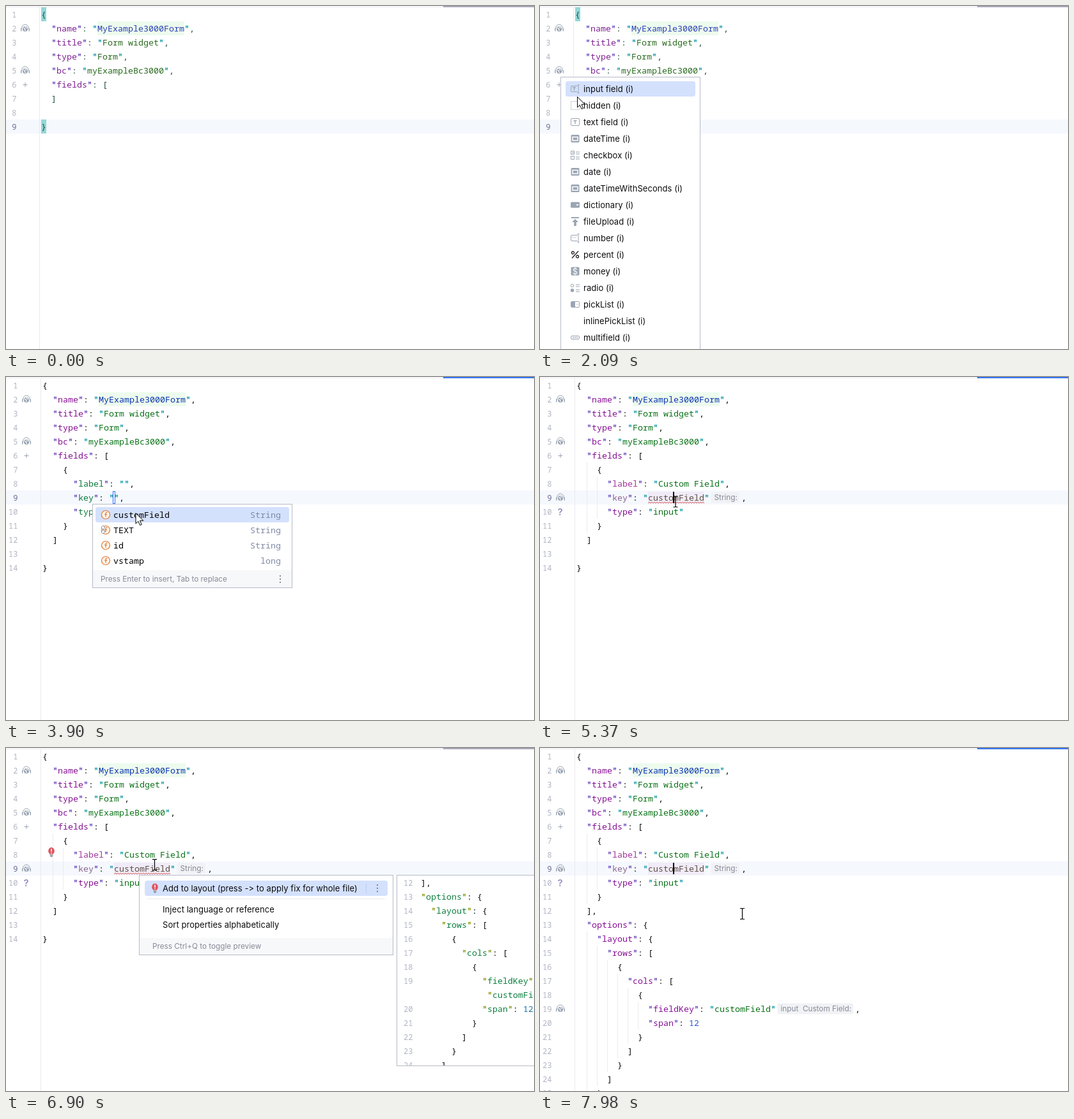
Write an HTML page that moves like this. It is 826x538 px and loops after 8000 ms.

```html
<!DOCTYPE html>
<html lang="en">
<head>
<meta charset="utf-8">
<title>Form widget editor</title>
<style>
  html, body { margin: 0; width: 100%; height: 100%; overflow: hidden; background: #fff; }
  svg { display: block; width: 826px; height: 538px; }
  text { white-space: pre; font-variant-ligatures: none; font-feature-settings: "calt" 0; }
  .mono { font: 13.333px "Noto Sans Mono", "DejaVu Sans Mono", monospace; }
  .ui { font: 13px Inter, "Open Sans", sans-serif; letter-spacing: .06px; fill: #0c0c0e; }
  .small { font: 11.75px Inter, "Open Sans", sans-serif; fill: #858a96; }
  .num { font: 12px "Noto Sans Mono", monospace; text-anchor: end; fill: #b0b5c3; }
  .num.cur { fill: #6c6a94; }
  .help { font: 600 15px Inter, sans-serif; fill: #9a8fc4; }
  .end { text-anchor: end; }
  .type { fill: #7f8aa3; }
  .icon { fill: none; stroke: #9aa5b3; }
  .solid { fill: #9aa5b3; stroke: none; }
  .paper { fill: #fff; stroke: none; }

  .punct { fill: #0a0a0a; }
  .key { fill: #871094; }
  .str { fill: #0a7217; }
  .name { fill: #0a35b0; }
  .digit { fill: #2e5bdc; }
  .kq { fill: #6f4fc0; stroke: #6f4fc0; stroke-width: .5px; }
  .sq { fill: #1c9fac; stroke: #1c9fac; stroke-width: .5px; }
  .key.pink { fill: #a5359c; }
  .key.dim { fill: #8a6590; }
  .key.fresh { fill: #0d7c3c; }
  .str.brown { fill: #5f5148; }
  .idle .punct { fill: #1f4d3d; }
  .idle .key { fill: #7f2292; }
  .idle .str { fill: #2a6b1f; }
  .idle .name { fill: #2c42b6; }
  .preview .key, .preview .str { fill: #0d8040; }
  .preview .kq, .preview .sq { fill: #8f9c18; stroke: #8f9c18; }
  .preview .digit { fill: #1a78a8; }
</style>
</head>
<body>
<svg id="stage" viewBox="0 0 826 538"></svg>
<script>
const LOOP = 8000, COL = 8, ROW = 22;
const mid = row => 13 + ROW * (row - 1);

const text = (x, y, s, cls) => `<text x="${x}" y="${y}" class="${cls}">${s}</text>`;
const rect = (x, y, w, h, fill, more = '') =>
  `<rect x="${x}" y="${y}" width="${w}" height="${h}" fill="${fill}" ${more}/>`;
const path = (d, more = '') => `<path d="${d}" ${more}/>`;
const at = (x, y, s) => `<g transform="translate(${x} ${y})">${s}</g>`;
// Windows are start/end pairs in ms.
const layer = (windows, s) => `<g data-on="${windows}">${s}</g>`;
const frame = (x, y, w, h) => rect(x + .5, y + .5, w, h, '#fff', 'stroke="#b7bac8"');
const dots = (x, y) => [-5, 0, 5].map(d => `<circle cx="${x}" cy="${y + d}" r="1.1" fill="#6c707e"/>`).join('');

function codeLine(src, x, y, keyTone = '', strTone = '') {
  const token = /"([^"]*)"(:?)|(\d+)|<([^|]+)\|(\d+)>|[^"\d<]+/g;
  let out = '';
  for (const [all, body, colon, digits, hint, room] of src.matchAll(token)) {
    if (hint) {
      out += rect(x + 2.5, y - 8.5, room - 5.5, 17, '#f1f2f5', 'rx="3"') + text(x + 7.5, y + 4, hint, 'small');
      x += +room;
      continue;
    }
    if (body !== undefined) {
      const quote = `<tspan class="${colon ? 'kq' : 'sq'}">"</tspan>`;
      const cls = colon ? 'key ' + keyTone : body.startsWith('MyEx') ? 'name' : 'str ' + strTone;
      if (cls === 'name') out += rect(x + COL, y - 11, body.length * COL, ROW, '#edfbee');
      out += text(x, y + 5, `${quote}<tspan class="${cls}">${body}</tspan>${quote}<tspan class="punct">${colon}</tspan>`, 'mono');
    } else {
      out += text(x, y + 5, all, 'mono ' + (digits ? 'digit' : 'punct'));
    }
    x += all.length * COL;
  }
  return out;
}

function code(rows, { x, numX = x - 38.5, first = 1, top = 13, cur = 9, guides = false, keys = {}, strs = {} }) {
  let n = first - 1, out = '';
  rows.forEach((row, i) => {
    const y = top + ROW * i, wrapped = row[0] === '~';
    const src = wrapped ? row.slice(1) : row;
    if (!wrapped) {
      n++;
      out += text(numX, y + 4.5, n, n === cur ? 'num cur' : 'num');
    }
    const depth = src.search(/\S/);
    for (let c = 2; guides && c < depth; c += 2) out += rect(x + c * COL, y - 11, 1, ROW, '#ebecf0');
    out += codeLine(src, x, y, keys[n], strs[n]);
  });
  return out;
}

const globe = (x, row) => at(x, mid(row),
  path('M-5.5 1V0a5.5 6 0 0 1 11 0v1', 'class="icon"') +
  path('M-6.3 0v4.500M6.300 0v4.500', 'class="icon" stroke-width="1.4"') +
  '<circle cy="1" r="4" class="solid"/>' +
  path('M-3-.5l2.500 1 0 1.500 1 2M0-2.500l1 1.500 2 .5', 'fill="none" stroke="#fff" stroke-width="1.2"'));
const plus = x => path(`M${x - 3.5} 123.5h7M${x} 120v7`, 'class="icon"');
const chevron = row => path(`M41.5 ${mid(row) - 1.5}l3.7 3.5 3.7-3.5`, 'class="icon"');
const caret = x => rect(x - 1, 180, 2, 18, '#000');
const bulb = (x, y) => at(x, y,
  path('M-2.5 3.5C-6.5 0-5-7 0-7s6.5 7 2.5 10.5z', 'fill="#e0555d"') +
  path('M-2.5 5h5M-2 7h4', 'stroke="#8b8f9c" stroke-width="1.3"') +
  path('M0-5v4.5M0 .8v1.5', 'stroke="#fff" stroke-width="1.5"'));

const head = ['{', '  "name": "MyExample3000Form",', '  "title": "Form widget",', '  "type": "Form",',
  '  "bc": "myExampleBc3000",', '  "fields": ['];
const tail = ['  ]', '', '}'];
const field = (label, key, comma = ',') => ['    {', `      "label": "${label}",`, `      "key": "${key}"${comma}`,
  '      "type": "input"', '    }'];
const custom = field('Custom Field', 'customField', '<String:|50>,');
const options = hint => ['  ],', '  "options": {', '    "layout": {', '      "rows": [', '        {',
  '          "cols": [', '            {', `              "fieldKey": "customField"${hint},`,
  '              "span": 12', '            }', '          ]', '        }', '      ]', '    }'];

const wide = { x: 57 };
const tuned = { x: 57, guides: true, keys: { 8: 'pink', 9: 'dim' }, strs: { 9: 'brown' } };
const margin = x => rect(x - 3, 2, 1, 536, '#e9eaef') + globe(x - 25, 2) + globe(x - 25, 5) + plus(x - 25);

const editor =
  rect(0, 1, 826, 1, '#ebecf0') + rect(0, 178, 826, ROW, '#f5f8fd') +
  layer('0 2860 6350 7470', rect(684, 0, 142, 2, '#a9a7bb')) +
  layer('2860 6350 7470 8000', rect(684, 0, 142, 2, '#3574f0')) +
  layer('0 2860', '<g class="idle">' + margin(55) +
    rect(55, 2, 8, ROW, '#93d8d8') + rect(55, 178, 8, ROW, '#93d8d8') +
    code([...head, ...tail], { x: 55 }) + '</g>') +
  layer('770 1700', chevron(1) + chevron(6)) +
  layer('2860 8000', margin(57)) +
  layer('2860 4310', code([...head, ...field('', ''), ...tail],
    { ...wide, keys: { 8: 'fresh', 9: 'fresh', 10: 'fresh' } }) +
    rect(167.5, 179.5, 3, 19, 'none', 'stroke="#3574f0"')) +
  layer('4470 8000', globe(32, 9)) +
  layer('5110 8000', rect(169, 180, 88, 19, '#f0ebf7') + text(27.5, 216.5, '?', 'help')) +
  layer('4310 4470', code([...head, ...field('Custom Field', 'customField'), ...tail], { ...wide, guides: true })) +
  layer('4470 7470', code([...head, ...custom, ...tail], tuned)) +
  layer('5110 7470', path('M169 198' + 'l2-2l2 2'.repeat(22), 'fill="none" stroke="#d9534f" stroke-width=".9"')) +
  layer('7470 7920', code([...head, ...custom, ...options('')], tuned)) +
  layer('7920 8000', code([...head, ...custom, ...options('<input  Custom Field:|124>')], tuned) + globe(32, 19)) +
  layer('3400 3900', caret(169)) + layer('4310 5110', caret(257)) + layer('5110 5750 7470 8000', caret(209)) +
  layer('5750 7470', bulb(71, 163));

const box = (w, h, cls = 'icon') => `<rect x="${-w / 2}" y="${-h / 2}" width="${w}" height="${h}" rx="1.5" class="${cls}"/>`;
const tee = path('M-2.5-2h5M0-2v5', 'class="icon" stroke-width="1.3"');
const fieldBox = path('M3.500-4.500h-8.500q-1.500 0-1.500 1.500v6q0 1.500 1.500 1.500h8.500M5-6v12M3.500-6.500h3M3.500 6.500h3', 'class="icon"');
const calendar = box(13, 12, 'solid') + path('M-4-2.5h8v5.5h-8z', 'fill="none" stroke="#fff" stroke-width="1.5"');
const bars = path('M1-5h6M1-2h6M1 3h6M1 6h6', 'class="icon"');
const menu = [
  ['input field', fieldBox + at(-1.5, 0, tee)],
  ['hidden', path('M-6.5-6.5h13v13h-13z', 'class="icon" stroke-dasharray="1 1"')],
  ['text field', box(13, 11) + tee],
  ['dateTime', calendar],
  ['checkbox', path('M-6.5-6.5h5v5h-5zM-6.5 1.5h5v5h-5zM-5-4l1 1 2-2', 'class="icon"') + bars],
  ['date', calendar],
  ['dateTimeWithSeconds', calendar],
  ['dictionary', box(14, 9, 'solid') + path('M1-1h5l-2.5 2.5z', 'class="paper"')],
  ['fileUpload', path('M-6-7h12v2h-12zM0-4l5 5h-3.2v6h-3.6v-6h-3.2z', 'class="solid"')],
  ['number', fieldBox + path('M-4-1h1.5M-1-1h1.5', 'class="icon"')],
  ['percent', path('M-5 5.5L5-5.5', 'stroke="#222" stroke-width="1.3"') +
    '<g fill="none" stroke="#222" stroke-width="1.3"><circle cx="-3.5" cy="-3" r="2"/><circle cx="3.5" cy="3" r="2"/></g>'],
  ['money', box(13, 13, 'solid') + '<text y="4.5" text-anchor="middle" class="ui" style="fill:#fff">$</text>'],
  ['radio', '<circle cx="-4.5" cy="-3.5" r="2.3" class="icon"/><circle cx="-4.5" cy="4" r="2.8" class="solid"/>' + bars],
  ['pickList', box(13, 9) + path('M-6-4h6v8h-6z', 'class="solid"') + path('M2 0h1M4 0h1', 'class="icon"')],
  ['inlinePickList', ''],
  ['multifield', box(13, 5) + path('M-4 0h2M-1 0h2M2 0h2', 'class="icon" stroke-width="1.5"')],
];
const pick = y => rect(40, y, 203, 24, '#d4e1fd', 'rx="3.5"');
const fieldMenu = layer('1440 2860', frame(32, 111, 218, 440) +
  layer('1440 1760 1980 2860', pick(118)) + layer('1760 1980', pick(144)) +
  menu.map(([label, icon], i) => at(55, 130 + 26 * i, icon + text(13, 4.7, label + ' (i)', 'ui'))).join(''));

const orangeF = '<circle r="6.5" fill="#fff5ec" stroke="#e07a33" stroke-width="1.2"/>' +
  path('M2.5-3.5q-2.5-.8-2.5 1.5v5.5M-2-.5h4', 'fill="none" stroke="#e07a33" stroke-width="1.2"');
const pin = path('M-7-4l3-3 3 3-3 3 3 3-3 4-3-3 3-3z', 'fill="#fff" stroke="#888d98"');
const completion = layer('3100 4310', frame(135, 199, 312, 131) + rect(136, 303, 311, 27, '#f7f8fa') +
  rect(140, 204, 303, 24, '#d4e1fd', 'rx="3.5"') +
  [['customField', 'String'], ['TEXT', 'String'], ['id', 'String'], ['vstamp', 'long']].map(([name, type], i) => {
    const y = 216 + 24 * i;
    return at(156, y, orangeF + (i === 1 ? pin : '')) +
      text(168, y + 5, name, 'mono') + text(430, y + 5, type, 'mono end type');
  }).join('') +
  text(148, 321, 'Press Enter to insert, Tab to replace', 'small') + dots(429, 317));

const quickFix = layer('5920 7470', frame(208, 199, 397, 125) + rect(209, 298, 396, 26, '#f7f8fa') +
  rect(217, 208, 380, 24, '#d4e1fd', 'rx="4"') + bulb(233, 219.5) +
  rect(563, 212, 1, 16, '#bccbee') + dots(581, 220) + rect(221, 236, 372, 1, '#ebecf0') +
  text(245, 224.7, 'Add to layout (press -&gt; to apply fix for whole file)', 'ui') +
  text(245, 258, 'Inject language or reference', 'ui') +
  text(245, 282, 'Sort properties alphabetically', 'ui') +
  text(229, 315, 'Press Ctrl+Q to toggle preview', 'small'));

const previewRows = options('').flatMap(row => row.includes('fieldKey')
  ? ['            "fieldKey":', '~             "customField",']
  : [row.slice(2)]).slice(0, -1);
const preview = layer('5920 6350', frame(611, 199, 230, 170)) +
  layer('6350 7470', frame(611, 199, 230, 299) +
    '<clipPath id="pane"><rect x="612" y="200" width="214" height="298"/></clipPath>' +
    '<g class="preview" clip-path="url(#pane)">' +
    code(previewRows, { x: 649, numX: 636.5, first: 12, top: 211 }) + '</g>');

const shapes = {
  arrow: path('M0 0v16.5l3.9-3.7 2.7 6.2 2.6-1.1-2.7-6.1h5.3z', 'fill="#fff" stroke="#000"'),
  hand: path('M-1.8 2C-1.8-.4 1.8-.4 1.8 2V8.5C2.5 7.3 5 7.6 5 9.5 5.7 8.5 8 8.9 8 10.7 8.8 9.8 10.8 10.3 10.8 12.2V16.5C10.8 19.5 8.7 20.5 8.7 23.5H-.4C-.6 20.5-3 19-5 15.5-7 12-4.6 11-1.8 14z',
    'fill="#fff" stroke="#1b1b2b" stroke-width="1.2"'),
  beam: path('M-3.5-8.5h2.5l1 1 1-1h2.5M-3.5 8.5h2.5l1-1 1 1h2.5M0-7.5v15', 'fill="none" stroke="#000" stroke-width="1.2"'),
};
const cursor = '<g id="cursor">' +
  Object.entries(shapes).map(([kind, s]) => `<g data-kind="${kind}">${s}</g>`).join('') + '</g>';

const stage = document.getElementById('stage');
stage.innerHTML = editor + fieldMenu + completion + quickFix + preview + cursor;

const kinds = [[0, 'arrow'], [1180, 'hand'], [1600, 'arrow'], [4310, 'beam'], [7230, 'arrow'], [7470, 'beam']];
const track = [
  [0, 375, 545], [69, 375, 545], [300, 280, 400], [560, 120, 200], [830, 42, 126],
  [1110, 42, 126], [1240, 33, 118.5], [1590, 33, 118.5], [1800, 60, 147], [1920, 62, 148], [2090, 58.5, 142.5],
  [2850, 58.5, 142.5], [3240, 134, 131], [3390, 134, 131], [3700, 203, 213.5],
  [4309, 203, 213.5], [4310, 205, 213.5], [4660, 205, 213.5], [4830, 208.5, 197],
  [5369, 208.5, 197], [5370, 212, 195.5], [6899, 212, 195.5], [6900, 231.5, 183], [7020, 350, 194],
  [7160, 350, 194], [7270, 316, 231], [7880, 316, 229], [7980, 316.5, 260], [LOOP, 316.5, 260],
];

const timed = [...stage.querySelectorAll('[data-on]')].map(el => ({ el, on: el.dataset.on.split(' ').map(Number) }));
const pointer = document.getElementById('cursor');

function draw(now) {
  const t = now % LOOP;
  for (const { el, on } of timed) {
    const shown = on.some((start, i) => i % 2 === 0 && t >= start && t < on[i + 1]);
    el.style.display = shown ? '' : 'none';
  }
  const kind = kinds.findLast(([start]) => t >= start)[1];
  for (const el of pointer.children) el.style.display = el.dataset.kind === kind ? '' : 'none';
  const i = track.findIndex(([end]) => t < end);
  const [t0, x0, y0] = track[i - 1], [t1, x1, y1] = track[i];
  const p = (t - t0) / (t1 - t0);
  pointer.setAttribute('transform', `translate(${x0 + (x1 - x0) * p} ${y0 + (y1 - y0) * p})`);
  requestAnimationFrame(draw);
}
draw(performance.now());
</script>
</body>
</html>
```
